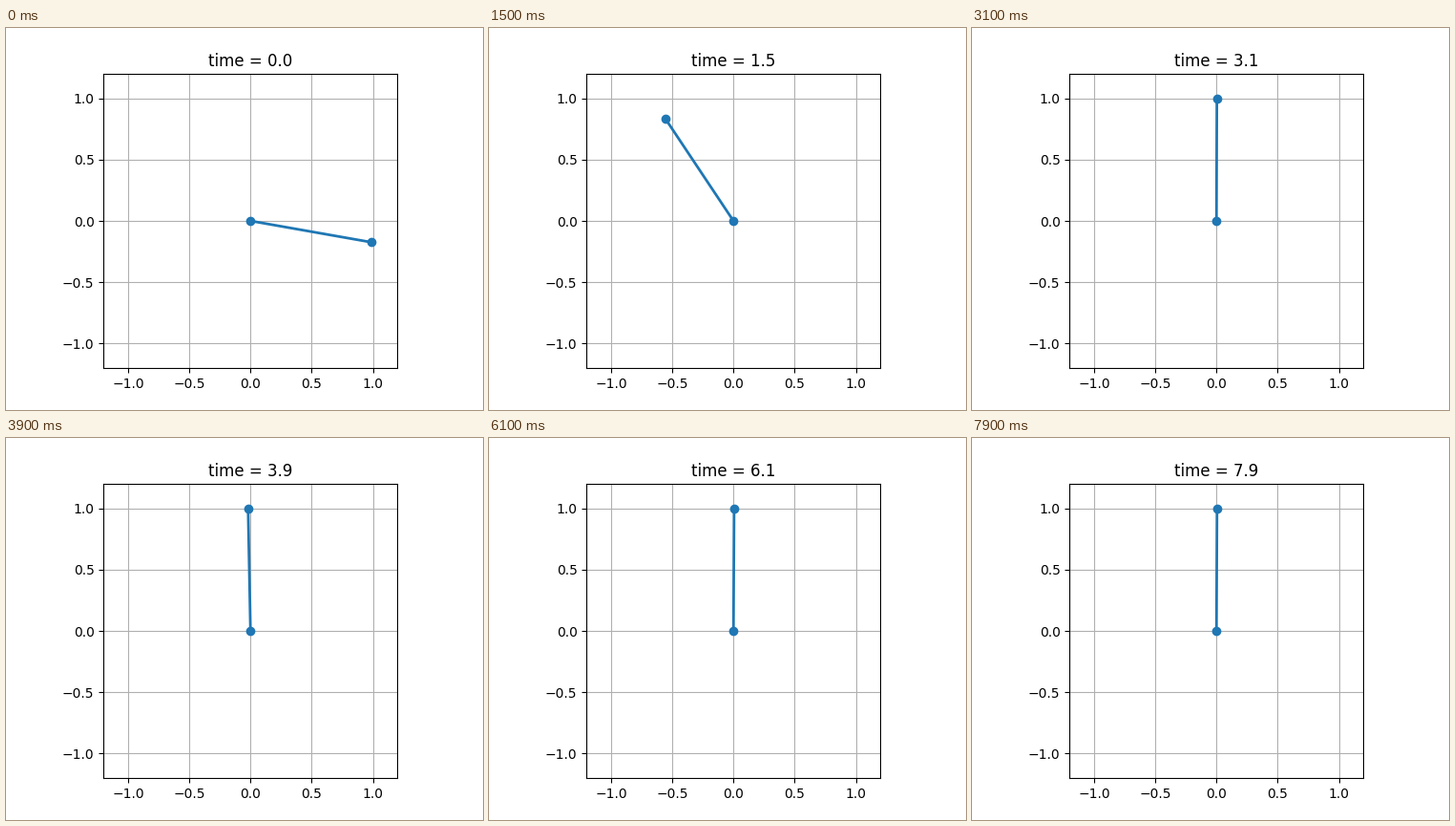
Write a matplotlib script that moves like this. It is 500 px wide and 400 px high and loops after 8 s.

```python
import numpy as np
import matplotlib.pyplot as plt
from matplotlib.animation import FuncAnimation

DT = 0.1
STEPS = 80
CATCH = 1.8     # time at which the balancing control takes over

# Swing-up phase q(t) as a smooth curve through a few key points
KEY_T = [0, 0.4, 0.9, 1.2, 1.5, CATCH]
KEY_Q = [-0.763, -0.97, -0.11, 0.86, 1.91, 3.185]
PHASE = np.polyfit(KEY_T, KEY_Q, len(KEY_T) - 1)


def swing(t):
    """Pendulum path that tends to the upright position as q grows."""
    return 4 * np.arctan(np.exp(-np.polyval(PHASE, t)))


def sway(t):
    """Small wobble around the balance point."""
    w = 2 * np.pi * (t - 3.9) / 1.5
    return np.radians(0.2 + 0.7 * (np.cos(w) + 0.3 * np.cos(2 * w)))


def lean(t):
    """Angle from upright, counterclockwise."""
    if t <= CATCH:
        return swing(t)
    late = t - CATCH
    return swing(CATCH) * np.exp(-6 * late) + min(1, late / 2) * sway(t)


fig = plt.figure(figsize=(5, 4), dpi=100)
ax = fig.add_subplot(autoscale_on=False, xlim=(-1.2, 1.2), ylim=(-1.2, 1.2))
ax.set_aspect("equal")
ax.grid()
rod, = ax.plot([], [], "o-", lw=2)
title = ax.set_title("time = 0.0")


def update(step):
    t = step * DT
    phi = lean(t)
    rod.set_data([0, -np.sin(phi)], [0, np.cos(phi)])
    title.set_text(f"time = {t:.1f}")
    return rod, title


anim = FuncAnimation(fig, update, frames=STEPS, interval=1000 * DT,
                     repeat=True, repeat_delay=0, blit=False)
plt.show()
```
